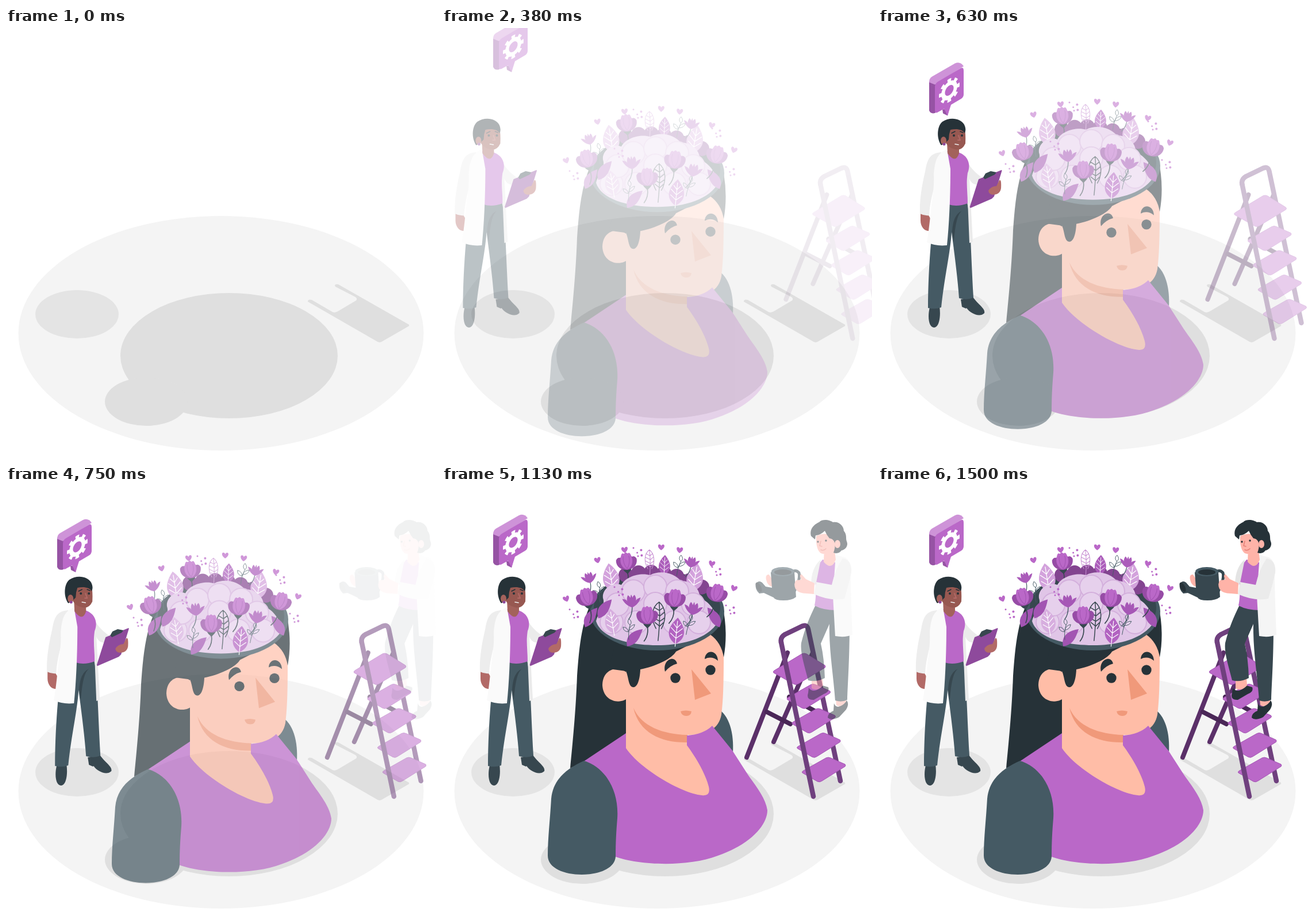
Animation of 748 by 748 pixels, one loop 1540 ms. Source, as an HTML page:

```html
<!DOCTYPE html>
<html lang="en">
<head>
<meta charset="utf-8">
<title>Garden of the mind</title>
<style>
html, body { margin: 0; width: 100%; height: 100%; overflow: hidden; background: #fff }
svg { display: block; width: 100vw; height: 100vh }
.line { fill: none; stroke-linecap: round; stroke-linejoin: round }
.dark { fill: #263238 }
.slate { fill: #37474f }
.teal { fill: #455a64 }
.purple { fill: #ba68c8 }
.plum { fill: #8e4a9c }
.skin { fill: #ffbda7 }
.blush { fill: #f0997a }
.brown { fill: #b26a67 }
.pink { fill: #ffb3a8 }
</style>
</head>
<body>
<svg viewBox="0 0 748 748">
<defs>
  <g id="peony">
    <path class="line" stroke="#37474f" stroke-width="1.6" d="M0 18Q2 32-6 42"/>
    <path class="slate" d="M-11 7L-5 16L0 21L5 16L11 7Z"/>
    <path d="M-18-4C-19 8-9 14 0 14S19 8 18-4Q15-10 10-8Q6-15 0-15T-10-8Q-15-10-18-4Z" fill="#974ca6"/>
    <path class="purple" d="M-9-10C-13 1-8 11 0 13C8 11 13 1 9-10Q7-18 3-14Q0-19-3-14Q-7-18-9-10Z"/>
    <path class="line" stroke="#a254b2" d="M-5-10Q-7 2 0 12Q7 2 5-10"/>
  </g>
  <g id="fan">
    <path class="line" stroke="#455a64" stroke-width="1.5" d="M0 11Q-1 24-8 32"/>
    <path d="M0 11C-8 8-14 2-17-6C-11-5-9-3-8-1C-9-5-8-9-6-12Q-3-10-2-7Q-1-11 0-13Q1-11 2-7Q3-10 6-12C8-9 9-5 8-1C9-3 11-5 17-6C14 2 8 8 0 11Z"/>
  </g>
  <g id="leaf">
    <path d="M0 22C-20 10-15-8 0-24C15-8 20 10 0 22Z"/>
    <path class="line" stroke="#fff" stroke-width="1.2" d="M0 26V-18M-10 4L0 12L10 4M-10-6L0 3L10-6M-6-13L0-6L6-13"/>
  </g>
  <path id="frond" class="line" stroke-width="1.4" d="M0 40Q3 0 0-24C-13-15-13 5-4 20M0-24C12-15 13 5 5 20M-6 10L2 16L8 10M-9 2L2 8L10 2M-10-7L2-1L9-7M-8-15L1-10L7-15"/>
  <path id="blade" d="M-16-13C2-12 16-3 13 15C-2 14-9 5-16-13Z"/>
  <path id="sprig" class="line" d="M-3 20Q-3 4 2-8M-2 5Q-12 4-12-5Q-3-4-2 5M-1 2Q9 1 11-8Q1-7-1 2M2-8Q-5-13 1-20Q8-13 2-8"/>
  <path id="heart" d="M0 6C-9 0-7-6-4-6Q-1-6 0-3Q1-6 4-6C7-6 9 0 0 6Z"/>
  <path id="step" d="M627 499Q625 497 629 495L668 473Q672 471 676 473L701 484Q703 486 701 488L661 513Q657 516 653 514Z"/>
</defs>

<g fill="#dfdfdf">
  <ellipse cx="374" cy="531" rx="352.5" ry="204" fill="#f4f4f4"/>
  <ellipse cx="123.5" cy="498" rx="72.5" ry="42" fill="#e4e4e4"/>
  <ellipse cx="388" cy="570" rx="189" ry="109"/>
  <ellipse cx="244" cy="650" rx="72" ry="42"/>
  <path d="M525 476Q525 471 532 473L568 494Q572 496 577 493L609 474Q612 471 608 468L573 450Q570 445 578 446L701 516Q702 518 700 519L653 546Q649 548 645 545Z"/>
</g>

<g id="doctor">
  <path class="slate" d="M83 486L100 484C103 505 98 522 90 521C81 520 79 502 83 486ZM137 472L158 468C169 483 180 488 178 496C170 504 154 497 147 487L146 488L139 485Z"/>
  <path class="teal" d="M117 305L148 303C154 330 154 380 159 469Q148 474 134 470C132 440 127 400 121 355C119 390 109 430 103 486Q92 490 80 487C80 450 82 410 85 375Z"/>
  <path d="M122 355Q123 325 139 318Q128 325 125 372Z" fill="#37474f"/>
  <path d="M144 222C150 240 160 250 176 262L167 273C158 272 154 268 152 262L158 372L152 374L147 250Z" fill="#ebebeb"/>
  <path class="purple" d="M113 214L135 217C152 224 154 240 149 252C146 270 149 285 149 305Q131 312 116 307Z"/>
  <path class="brown" d="M67 320L81 326C89 339 88 343 83 340L85 352C76 356 67 347 67 335Z"/>
  <path d="M103 216C84 218 79 226 75 250C69 275 65 300 66 323Q74 327 82 326C83 300 92 275 96 255Z" fill="#ededed"/>
  <path d="M113 211C96 218 92 230 90 255Q91 275 87 300C84 325 82 350 78 373Q94 380 113 378C117 340 119 290 119 245Z" fill="#fafafa"/>
  <path d="M113 199L134 207L134 218Q128 237 114 218Z" fill="#a3625c"/>
  <path d="M109 173L143 172Q146 183 145 201Q139 214 127 211Q113 208 109 195Z" fill="#975851"/>
  <path class="dark" d="M103 204C94 191 96 170 105 163C118 154 137 157 143 168Q147 176 144 183C139 176 130 175 119 177Q116 185 116 194L111 199Z"/>
  <ellipse cx="107" cy="196" rx="5" ry="7" fill="#a3625c"/>
  <circle class="plum" cx="108" cy="202" r="2.5"/>
  <circle class="dark" cx="125" cy="187" r="2"/><circle class="dark" cx="139" cy="187" r="2"/>
  <path class="line" stroke="#263238" stroke-width="1.6" d="M121 183L127 180M136 180L141 182"/>
  <path class="line" stroke="#b26a67" stroke-width="2" d="M133 187L136 195L132 195"/>
  <path class="line" stroke="#eee" stroke-width="1.6" d="M127 202L133 203"/>
  <path class="plum" d="M168 263L208 247Q209 248 208 250L195 293L191 297L154 313Q152 312 153 310Z"/>
  <path class="slate" d="M176 260L180 253L189 249L199 251L196 255L179 263Z"/>
  <path class="brown" d="M185 283Q190 275 199 275L204 265Q208 262 207 279Q205 290 193 290Q186 290 185 283Z"/>
</g>

<g id="bubble">
  <path d="M89 82L100 86V137Q92 140 89 133ZM112 131L113 138L121 142L124 130Z" fill="#9653a4"/>
  <path d="M89 84Q89 77 94 74L134 51Q143 47 149 56L99 88Z" fill="#ce93d8"/>
  <path class="purple" d="M99 92Q99 86 104 83L143 60Q149 56 149 64V105Q149 110 144 113L127 123L121 142L115 130L104 136Q99 139 99 132Z"/>
  <g class="line" stroke="#fff" transform="translate(124 98) skewY(-30) scale(.9 1) rotate(-11)">
    <circle r="12" stroke-width="7"/>
    <circle r="16.5" stroke-width="7" pathLength="16" stroke-dasharray="1" stroke-linecap="butt"/>
  </g>
</g>

<g id="head">
  <path class="teal" d="M478 386C500 398 508 430 506 464L465 425Z"/>
  <path class="dark" d="M258 206C241 245 238 290 235 330C233 390 227 450 223 491L325 440L430 280L490 298Q498 255 488 208Z"/>
  <path class="skin" d="M320 320L345 318C378 311 400 300 407 288L466 258Q486 272 490 298C490 345 489 375 486 398C481 423 462 433 426 433V450L470 480V540H400L320 470Z"/>
  <path class="skin" d="M324 328C314 313 280 313 279 346C280 376 312 382 326 366Z"/>
  <path class="dark" d="M300 280L412 280C400 302 370 314 345 319C344 340 339 350 333 350C324 350 325 333 320 322L290 318Z"/>
  <path class="blush" d="M333 386C347 418 384 432 427 433V446C382 447 343 430 333 386ZM434 319L468 361L440 372ZM415 392Q424 389 434 392Q433 400 425 400Q417 400 415 392Z"/>
  <g class="dark">
    <circle cx="406" cy="334" r="8.7"/><circle cx="467" cy="320" r="8.7"/>
    <path d="M388 323C383 302 405 293 409 309Q397 312 388 323ZM457 301C458 284 479 284 480 304Q469 295 457 301Z"/>
  </g>
  <path class="purple" d="M320 430L245 480L290 640L302 645C340 659 425 664 480 643C540 622 566 588 566 564C563 542 545 521 532 502L505 460L470 417Q455 432 426 434V451C443 474 458 500 464 523Q468 540 452 538C418 535 345 493 320 456Z"/>
  <path class="teal" d="M247 478C285 490 308 530 305 578C303 602 302 620 302 645C300 667 270 676 243 676C213 676 184 665 184 643C184 613 188 580 190 544C193 512 214 493 247 478Z"/>
  <ellipse class="teal" cx="374" cy="218" rx="117" ry="68"/>
  <ellipse class="slate" cx="374" cy="212" rx="110" ry="65"/>
  <g id="back"></g>
  <path d="M268 235C272 218 285 208 280 195C278 180 295 166 312 172C320 157 345 150 362 155C380 145 405 152 415 165C435 165 450 180 448 195C466 200 478 222 481 235C465 263 425 277 374 277C320 277 276 262 268 235Z" fill="#e0c5e7"/>
  <g id="folds" fill="#e6d0ec" stroke="#d3afdc" stroke-width="2"></g>
  <g id="front"></g>
</g>

<g id="ladder">
  <path class="line" stroke="#5b3069" stroke-width="8" d="M601 290L530 472M645 290L577 445"/>
  <path class="line" stroke="#4a2757" stroke-width="8" d="M565 393L606 414M604 367L655 395"/>
  <path class="line" stroke="#6f407e" stroke-width="8.5" d="M590 272Q588 263 597 258L626 244Q635 240 637 249L693 513"/>
  <g id="steps" class="purple" stroke="#a355b3">
    <path d="M577 325Q575 323 578 321L626 292Q630 290 634 292L666 312Q668 314 666 316L620 344Q615 347 611 344Z"/>
  </g>
  <path class="line" stroke="#6f407e" stroke-width="8.5" d="M590 272L646 540"/>
</g>

<g id="gardener">
  <path class="dark" d="M617 351C624 361 635 354 641 347L651 350Q654 358 643 362L626 372Q612 373 616 360ZM661 378C665 389 675 383 683 373Q688 379 682 389L670 402Q656 409 650 403Q650 395 660 391Z"/>
  <path class="pink" d="M622 334L641 332L642 347Q632 358 622 352ZM664 370H682V375Q672 387 665 381ZM543 163Q541 154 548 154L553 162V175Q545 173 543 163Z"/>
  <path class="slate" d="M629 207L662 213L688 245C688 300 685 340 684 372Q674 377 663 373C660 330 652 285 653 240L638 274Q644 300 645 334Q630 342 616 338C609 310 602 290 604 273C610 248 620 225 629 207Z"/>
  <path class="purple" d="M641 128L664 133L664 216Q642 216 627 208C632 190 627 163 629 150Q633 137 641 128Z"/>
  <path d="M638 128Q622 141 621 170L611 178L617 187L630 168Z" fill="#e4e4e4"/>
  <path d="M664 120L680 124Q690 130 690 145C690 190 692 225 693 259Q680 264 663 261L659 190Z" fill="#f5f5f5"/>
  <path d="M676 126Q693 129 691 151Q686 174 679 196Q655 201 626 188L630 167L657 172Q663 145 676 126Z" fill="#ebebeb"/>
  <path class="pink" d="M644 107L662 110L664 128Q657 148 643 132ZM630 87Q650 77 668 93L666 111Q653 122 638 117Q629 110 630 87Z"/>
  <path class="dark" d="M621 87C617 73 630 65 635 63C642 56 655 60 659 63C670 61 678 70 678 78C684 85 681 91 683 96C687 105 679 112 674 112Q669 119 660 116C665 103 663 92 653 91Q648 85 645 78Q638 85 629 86L628 93Z"/>
  <ellipse class="pink" cx="667" cy="101" rx="5" ry="7"/>
  <circle class="dark" cx="633" cy="97" r="1.7"/><circle class="dark" cx="647" cy="95" r="1.7"/>
  <path class="line" stroke="#e57f76" stroke-width="1.5" d="M638 96L636 104L640 105M638 111Q643 113 647 109"/>
  <path class="line" stroke="#37474f" stroke-width="5" d="M586 151Q594 144 600 151Q602 157 598 171L590 187"/>
  <path class="slate" d="M551 150L592 149L595 193Q588 199 573 199Q558 199 556 194L539 186L531 187Q523 180 525 170Q530 163 536 168L542 175L553 177Z"/>
  <ellipse cx="572" cy="149" rx="20" ry="8" fill="#455a64"/>
  <ellipse class="dark" cx="572" cy="150" rx="15" ry="5"/>
  <ellipse class="dark" cx="530" cy="176" rx="4" ry="9" transform="rotate(-28 530 176)"/>
  <path class="pink" d="M627 169L612 162L604 153Q600 155 604 163L595 164Q590 170 594 179Q599 187 614 187L626 188Z"/>
</g>
</svg>

<script>
const $ = id => document.getElementById(id);

function add(parent, tag, attrs) {
  const el = document.createElementNS('http://www.w3.org/2000/svg', tag);
  for (const name in attrs) el.setAttribute(name, attrs[name]);
  $(parent).append(el);
}

// Plants lean away from the middle of the bed; blades are mirrored on its left.
function plant(layer, shape, color, size, ...places) {
  const paint = shape === 'frond' || shape === 'sprig' ? 'stroke' : 'fill';
  for (const [x, y] of places) {
    const side = shape === 'blade' && x < 365 ? -1 : 1;
    add(layer, 'use', { href: '#' + shape, [paint]: color,
      transform: `translate(${x} ${y}) rotate(${(x - 365) * .13}) scale(${size * side} ${size})` });
  }
}

// Half a ring of folds, from left to right.
function folds(count, rx, ry, r) {
  for (let i = 0; i < count; i++) {
    const a = Math.PI * i / (count - 1);
    add('folds', 'circle', { cx: 371 - rx * Math.cos(a), cy: 237 - ry * Math.sin(a), r });
  }
}

function dots(x, y) {
  for (let i = 0; i < 5; i++)
    add('front', 'circle', { cx: x + 8 * Math.sin(i * 2.4), cy: y + 8 * Math.cos(i * 1.9), r: 1.5 + i % 2 * .5, fill: '#ba68c8' });
}

for (let x = 320; x < 460; x += 22)
  add('back', 'circle', { cx: x, cy: 150 + (x - 360) ** 2 / 330, r: 13, fill: '#834590' });
plant('back', 'frond', '#c78fd2', .75, [361, 129]);
plant('back', 'sprig', '#455a64', .9, [413, 138], [274, 184]);
plant('back', 'leaf', '#d3a2dc', 1.08, [294, 160], [440, 160]);
plant('back', 'leaf', '#ab5cba', .75, [387, 138]);
plant('back', 'peony', '', 1, [321, 132]);
plant('back', 'fan', '#ab5cba', .82, [256, 160], [434, 133]);

folds(7, 76, 62, 20);
folds(3, 33, 32, 20);

plant('front', 'blade', '#a254b2', 1, [258, 228], [282, 213], [334, 263], [474, 228]);
plant('front', 'frond', '#37474f', 1.05, [377, 227]);
plant('front', 'sprig', '#455a64', .9, [326, 249], [430, 241]);
plant('front', 'fan', '#a657b6', .95, [330, 201], [437, 214]);
plant('front', 'leaf', '#d7aedf', .95, [296, 236]);
plant('front', 'leaf', '#b263c1', 1, [408, 253]);
plant('front', 'peony', '', 1.04, [252, 194], [478, 187], [405, 196], [357, 226]);
for (const a of [.13, .89, 1.25, 1.68, 1.9, 2.34, 2.83])
  plant('front', 'heart', '#ba68c8', .85, [365 - 150 * Math.cos(a), 210 - 104 * Math.sin(a)]);
for (const [x, y] of [[341, 114], [478, 147], [502, 214], [230, 221], [308, 182]]) dots(x, y);

for (let i = 3; i >= 0; i--)
  add('steps', 'use', { href: '#step', transform: `translate(${-8.8 * i} ${-42.5 * i})` });

const progress = (t, from, to) => Math.min(1, Math.max(0, (t - from) / (to - from)));

function pose(id, x, y, opacity) {
  $(id).setAttribute('transform', `translate(${x} ${y})`);
  $(id).setAttribute('opacity', opacity);
}

function draw(now) {
  const tick = Math.floor((now % 1540 + 5) * .024); // 24 pictures a second
  const t = tick / .024, shown = tick >= 5;

  const rise = progress(t, 0, 970) ** 1.5;
  pose('head', 0, 45 * (1 - rise), shown * rise);
  pose('ladder', 90 * (1 - rise), 0, shown * rise ** 1.7);

  // Overshoots by 7, then settles evenly.
  const swing = progress(t, 0, 625) ** 2;
  const slide = 79 * swing - 72 - 7 * progress(t, 625, 1125);
  pose('doctor', slide, 0, shown * swing);
  pose('bubble', 0, slide * 1.5, shown * swing);

  const rest = 1 - progress(t, 667, 1500);
  pose('gardener', 64 * rest ** 1.4, 0, (1 - rest) ** 1.2);
}

function loop() {
  draw(performance.now());
  requestAnimationFrame(loop);
}
loop();
</script>
</body>
</html>
```
